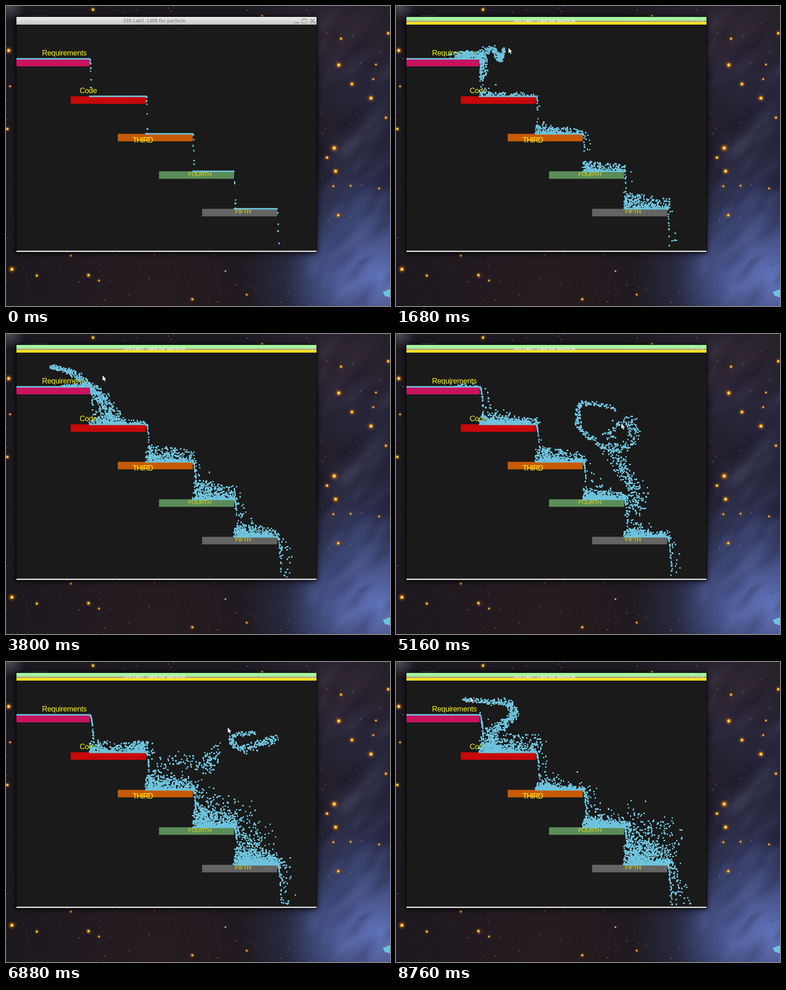
Animation of 847 by 661 pixels, one loop 8.79 s. Source, as an HTML page with a canvas:

```html
<!DOCTYPE html>
<html lang="en">
<head>
<meta charset="utf-8">
<title>Waterfall particles</title>
<style>
html, body { margin: 0; width: 100%; height: 100%; overflow: hidden; background: #17151c; }
canvas { display: block; }
</style>
</head>
<body>
<canvas id="stage" width="847" height="661"></canvas>
<script>
const W = 847, H = 661, TICK = 40, LOOP = 8790, STEPS = 220, DT = TICK / 1000, G = 300;
const ctx = document.getElementById('stage').getContext('2d');
const WATER = '#6ec3dc';

let seed = 335;
function rnd(a = 0, b = 1) {
  seed = (seed * 1664525 + 1013904223) >>> 0;
  return a + (b - a) * seed / 4294967296;
}
const mix = (a, b, f) => a + (b - a) * f;
const ease = f => f * f * (3 - 2 * f);

// Platforms: box left, wet part left, right end, colour
const steps = [
  [23, 23, 184.7, '#c8135f'],
  [143, 183, 308.7, '#c80808'],
  [246.5, 307, 412, '#c85a05'],
  [337.5, 411, 503, '#5a8c5a'],
  [432.5, 502, 598.3, '#646464']
].map(([box, left, right, color], i) => ({ box, left, right, color, top: 116.4 + 82.6 * i }));

// ---------- pointer: strokes are drawn at even pace through a few points ----------
const strokes = [];

function stroke(from, to, ...xy) {
  const pts = [];
  for (let i = 0; i < xy.length; i += 2) pts.push([xy[i], xy[i + 1]]);
  strokes.push({ from, to, pts });
}
const rest = (t, x, y) => stroke(t, t, x, y);

// Catmull-Rom curve through the points of a stroke
function along({ pts }, u) {
  const last = pts.length - 1;
  const i = Math.max(0, Math.min(last - 1, Math.floor(u * last))), f = u * last - i;
  const [a, b, c, d] = [-1, 0, 1, 2].map(o => pts[Math.max(0, Math.min(last, i + o))]);
  return [0, 1].map(n => b[n] + f / 2 * (c[n] - a[n] + f * (2 * a[n] - 5 * b[n] + 4 * c[n] - d[n] + f * (3 * (b[n] - c[n]) + d[n] - a[n]))));
}

function pointer(t) {
  const i = strokes.findIndex(s => s.to >= t), s = strokes[i];
  if (t >= s.from) return along(s, s.to > s.from ? (t - s.from) / (s.to - s.from) : 0);
  const p = strokes[i - 1], a = p.pts[p.pts.length - 1], b = s.pts[0];
  const f = ease((t - p.to) / (s.from - p.to));
  return [mix(a[0], b[0], f), mix(a[1], b[1], f)];
}

rest(40, 717, 300);
stroke(560, 950, 120, 75, 160, 72);
stroke(1000, 1660, 188, 87, 188, 88, 188, 88, 188, 88, 213, 86, 230, 116, 238, 93);
rest(1680, 248, 92);
stroke(1900, 2500, 180, 76, 110, 74);
stroke(2950, 3720, 240, 90, 222, 88, 205, 88, 184, 92, 142, 76, 99, 71);
rest(3800, 213, 91);
stroke(4050, 4450, 525, 205, 530, 200, 505, 200, 485, 195);
stroke(4480, 5130, 470, 185, 475, 153, 512, 143, 524, 165, 520, 205, 495, 226, 465, 232,
  435, 219, 408, 201, 401, 176, 405, 153, 440, 153, 485, 165);
rest(5160, 497, 197);
stroke(5600, 6180, 390, 101, 345, 124, 300, 131, 255, 148, 272, 126, 282, 105, 320, 97,
  370, 98, 420, 112, 447, 128, 447, 128, 468, 112);
rest(6200, 514, 121);
stroke(6420, 6800, 520, 165, 590, 150, 560, 165, 510, 180, 500, 160, 550, 155);
stroke(7120, 7420, 160, 84, 175, 80, 215, 82, 260, 83, 315, 84);
rest(7520, 213, 60);
stroke(7800, 8720, 200, 85, 225, 85, 205, 88, 222, 90, 248, 92, 260, 88, 245, 78, 200, 84, 149, 83);
rest(8760, 164, 77);

// ---------- water ----------
const frames = Array.from({ length: STEPS }, () => []);

function hit(x, y0, y1) {
  return steps.find(s => x >= s.left - 2 && x <= s.right + 1 && y0 <= s.top && y1 > s.top);
}

// Follows one drop from time t until it joins the film on a platform or leaves.
function drop(t, x, y, vx, vy) {
  let k = Math.ceil(t / TICK), dt = k * DT - t / 1000;
  for (; k < STEPS; k++, dt = DT) {
    const y0 = y;
    x += vx * dt;
    y += vy * dt + G * dt * dt / 2;
    vy += G * dt;
    const s = hit(x, y0, y);
    if (s) {
      if (vy < 75) return;
      y = s.top - 1;
      vy *= -rnd(0.3, 0.58);
      vx = rnd(10, 60);
    }
    if (y > 536 || x > 684) return;
    if (k >= 0) frames[k].push(x, y);
  }
}

// Drops let go by the pointer
strokes.forEach(s => {
  for (let t = s.from; t < s.to; t += 1.7) {
    const [x, y] = along(s, (t - s.from) / (s.to - s.from));
    const a = rnd(0, 2 * Math.PI), r = rnd(0, 4), v = rnd(0, 24);
    drop(t, x + r * Math.cos(a), y + r * Math.sin(a), v * Math.cos(a), v * Math.sin(a));
  }
});

// Splash height on the lower platforms at a few moments
const moments = [0, 1680, 3800, 5160, 6200, 7520, 8760];
const surges = [
  [0, 10, 8, 22, 14, 35, 32],
  [0, 20, 38, 32, 32, 36, 14],
  [0, 22, 45, 22, 46, 58, 20],
  [0, 36, 26, 18, 44, 32, 66]
];

function surge(i, t) {
  const n = Math.max(1, moments.findIndex(m => m >= t));
  const f = (t - moments[n - 1]) / (moments[n] - moments[n - 1]);
  return mix(surges[i][n - 1], surges[i][n], ease(f));
}

steps.forEach((s, i) => {
  // trickle over the edge
  for (let k = -20; k < STEPS; k++) {
    const late = Math.max(0, k / STEPS);
    for (let n = rnd(0, 0.65 + 3.6 * late); n > 0.4; n--) {
      drop((k + rnd()) * TICK, s.right + rnd(0.5, 1.5), s.top + rnd(0, 2), rnd(0, 4) + 10 * Math.min(1, 2.5 * late), 0);
    }
  }
  // splashes off the film, higher near the upper fall
  if (i) for (let t = 0; t < STEPS * TICK; t += TICK) {
    const high = surge(i - 1, Math.min(8760, t + 360));
    for (let n = 2 * Math.sqrt(high); n > 0; n--) {
      const u = rnd() ** 1.4, rise = high * (1 - 0.4 * u) * rnd(0.2, 1.05);
      drop(t + rnd(0, TICK), mix(s.left, s.right, u), s.top - 1, rnd(0, 24), -Math.sqrt(2 * G * rise));
    }
  }
});

// ---------- scenery ----------
function glow(c, x, y, r, rgb, alpha) {
  const g = c.createRadialGradient(x, y, 0, x, y, r);
  g.addColorStop(0, `rgba(${rgb},${alpha})`);
  g.addColorStop(0.5, `rgba(${rgb},${alpha * 0.45})`);
  g.addColorStop(1, `rgba(${rgb},0)`);
  c.fillStyle = g;
  c.fillRect(x - r, y - r, 2 * r, 2 * r);
}

function dot(c, x, y, r, color) {
  c.fillStyle = color;
  c.beginPath();
  c.arc(x, y, r, 0, 7);
  c.fill();
}

function drawSky(c) {
  c.fillStyle = '#1b181f';
  c.fillRect(0, 0, W, H);
  glow(c, 330, 640, 380, '44,30,34', 0.7);
  glow(c, 740, 60, 240, '58,46,62', 0.75);
  glow(c, 810, 220, 170, '42,44,76', 0.7);
  glow(c, 720, 290, 120, '44,34,44', 0.6);
  glow(c, 800, 420, 190, '48,54,96', 0.8);
  glow(c, 740, 600, 220, '62,74,130', 0.85);
  glow(c, 825, 600, 210, '98,118,192', 0.95);
  // wisps, brighter towards the lower right
  for (let i = 0; i < 70; i++) {
    const y = rnd(0, H), f = y / H;
    c.save();
    c.translate(rnd(670, 860), y);
    c.rotate(rnd(-1.1, -0.5));
    c.scale(2.2, 0.8);
    glow(c, 0, 0, rnd(14, 34), rnd() < 0.5 ? '18,15,26' : `${72 + 40 * f},${66 + 60 * f},${84 + 110 * f}`, 0.2);
    c.restore();
  }
  glow(c, 8, 0, 34, '150,150,165', 0.4);
  for (let i = 0; i < 520; i++) {
    dot(c, rnd(0, W), rnd(0, H), 0.5 + 0.9 * rnd() ** 2, rnd() < 0.65 ? 'rgba(190,118,66,.65)' : 'rgba(180,170,190,.5)');
  }
  const stars = [
    192, 8, 3, 6, 98, 4, 3, 271, 3, 13, 580, 4, 182, 593, 3, 68, 594, 2.5, 411, 646, 2.5, 531, 636, 2,
    9, 177, 2, 734, 130, 4, 763, 172, 3.5, 805, 203, 4, 739, 72, 2.5, 724, 313, 4.5, 708, 334, 3,
    727, 364, 4, 733, 461, 3, 816, 129, 2, 838, 246, 2.5, 843, 60, 3, 760, 396, 2, 823, 402, 2,
    810, 161, 2, 722, 397, 2, 565, 22, 2, 205, 605, 2, 143, 550, 2
  ];
  for (let i = 0; i < stars.length; i += 3) {
    const [x, y, r] = stars.slice(i, i + 3);
    glow(c, x, y, r * 2.6, '200,110,20', 0.7);
    dot(c, x, y, r, '#e89a18');
    dot(c, x, y, r * 0.55, '#ffdf70');
  }
  dot(c, 484, 584, 2, '#b5b0b8');
  c.fillStyle = WATER;
  c.beginPath();
  c.moveTo(847, 624); c.lineTo(831, 630); c.lineTo(836, 639); c.lineTo(847, 642);
  c.fill();
}

function label(c, text, x, y, font, color, gap = 0) {
  c.font = font;
  c.letterSpacing = gap + 'px';
  c.fillStyle = color;
  c.fillText(text, x, y);
}

function drawWindow(c) {
  c.fillStyle = '#55545a';
  c.fillRect(54, 21, 37, 1);
  c.save();
  c.shadowColor = 'rgba(0,0,0,.8)';
  c.shadowBlur = 12;
  c.shadowOffsetY = 2;
  c.fillStyle = '#000';
  c.fillRect(22, 23, 664, 520);
  c.restore();
  c.fillStyle = '#1a1a1a';
  c.fillRect(23, 41, 662, 498);
  c.fillStyle = '#d8d8d6';
  c.fillRect(23, 539, 662, 3);
  steps.forEach(s => {
    c.fillStyle = s.color;
    c.fillRect(s.box, s.top, s.right - s.box, 16.6);
  });
  const sans = 'px "Liberation Sans", Arial, sans-serif', yellow = '#ffff00', dim = '#dfd820';
  label(c, 'Requirements', 79.5, 109, 16.4 + sans, yellow, -0.3);
  label(c, 'Code', 162.5, 191.5, 16.4 + sans, yellow, -0.3);
  label(c, 'THIRD', 279.5, 300.5, 16 + sans, yellow, -0.9);
  label(c, 'FOURTH', 402, 374.5, 13 + sans, dim, -0.5);
  label(c, 'FIFTH', 505.5, 457, 13 + sans, dim, -0.5);
  steps.forEach(s => {
    c.fillStyle = WATER;
    c.fillRect(s.left, s.top - 1.65, s.right + 1 - s.left, 3.3);
  });
}

function drawTitle(color) {
  const font = 'bold 10.6px "Open Sans", "Noto Sans", sans-serif';
  label(ctx, '335 Lab1', 258.5, 36, font, color);
  label(ctx, 'LMB for particle', 311, 36, font, color);
}

function drawButtons(color) {
  ctx.fillStyle = ctx.strokeStyle = color;
  ctx.fillRect(636, 36, 11, 2);
  ctx.lineWidth = 1;
  ctx.strokeRect(653.5, 28.5, 10, 9);
  ctx.fillRect(653, 28, 11, 2);
  ctx.lineWidth = 1.8;
  ctx.beginPath();
  ctx.moveTo(671, 28); ctx.lineTo(681, 38);
  ctx.moveTo(681, 28); ctx.lineTo(671, 38);
  ctx.stroke();
}

function drawBar(active) {
  if (!active) {
    const g = ctx.createLinearGradient(0, 24, 0, 41);
    g.addColorStop(0, '#ececec');
    g.addColorStop(1, '#c6c6c6');
    ctx.fillStyle = g;
    ctx.fillRect(23, 24, 662, 17);
    drawTitle('#969696');
    drawButtons('#969696');
    return;
  }
  [['#a5f5a0', 24, 8], ['#b3a488', 32, 3], ['#f5e020', 35, 6]].forEach(([color, y, h]) => {
    ctx.fillStyle = color;
    ctx.fillRect(23, y, 662, h);
  });
  ctx.save();
  ctx.beginPath();
  ctx.rect(23, 30, 662, 7);
  ctx.clip();
  drawTitle('#f0f0e6');
  ctx.globalAlpha = 0.4;
  drawButtons('#f0f0e6');
  ctx.restore();
}

function drawPointer(x, y) {
  const shape = [0, 0, 0, 12, 2.7, 9.6, 4.8, 14, 6.7, 13.1, 4.7, 8.8, 8.2, 8.8];
  ctx.beginPath();
  for (let i = 0; i < shape.length; i += 2) ctx.lineTo(x + shape[i], y + shape[i + 1]);
  ctx.closePath();
  ctx.lineWidth = 1.6;
  ctx.strokeStyle = '#000';
  ctx.stroke();
  ctx.fillStyle = '#f4f4f4';
  ctx.fill();
}

const back = document.createElement('canvas');
back.width = W;
back.height = H;
drawSky(back.getContext('2d'));
drawWindow(back.getContext('2d'));

function draw(now) {
  const k = Math.min(STEPS - 1, Math.floor((now % LOOP) / TICK)), t = k * TICK;
  ctx.drawImage(back, 0, 0);
  drawBar(t >= 440);
  ctx.fillStyle = WATER;
  const f = frames[k];
  for (let i = 0; i < f.length; i += 2) {
    const x = Math.round(f[i] - 1.65), y = Math.round(f[i + 1] - 1.65);
    ctx.fillRect(x, y, Math.round(f[i] + 1.65) - x, Math.round(f[i + 1] + 1.65) - y);
  }
  if (t >= 40) drawPointer(...pointer(t));
}

const start = performance.now();
function loop() {
  draw(performance.now() - start);
  requestAnimationFrame(loop);
}
loop();
</script>
</body>
</html>
```
